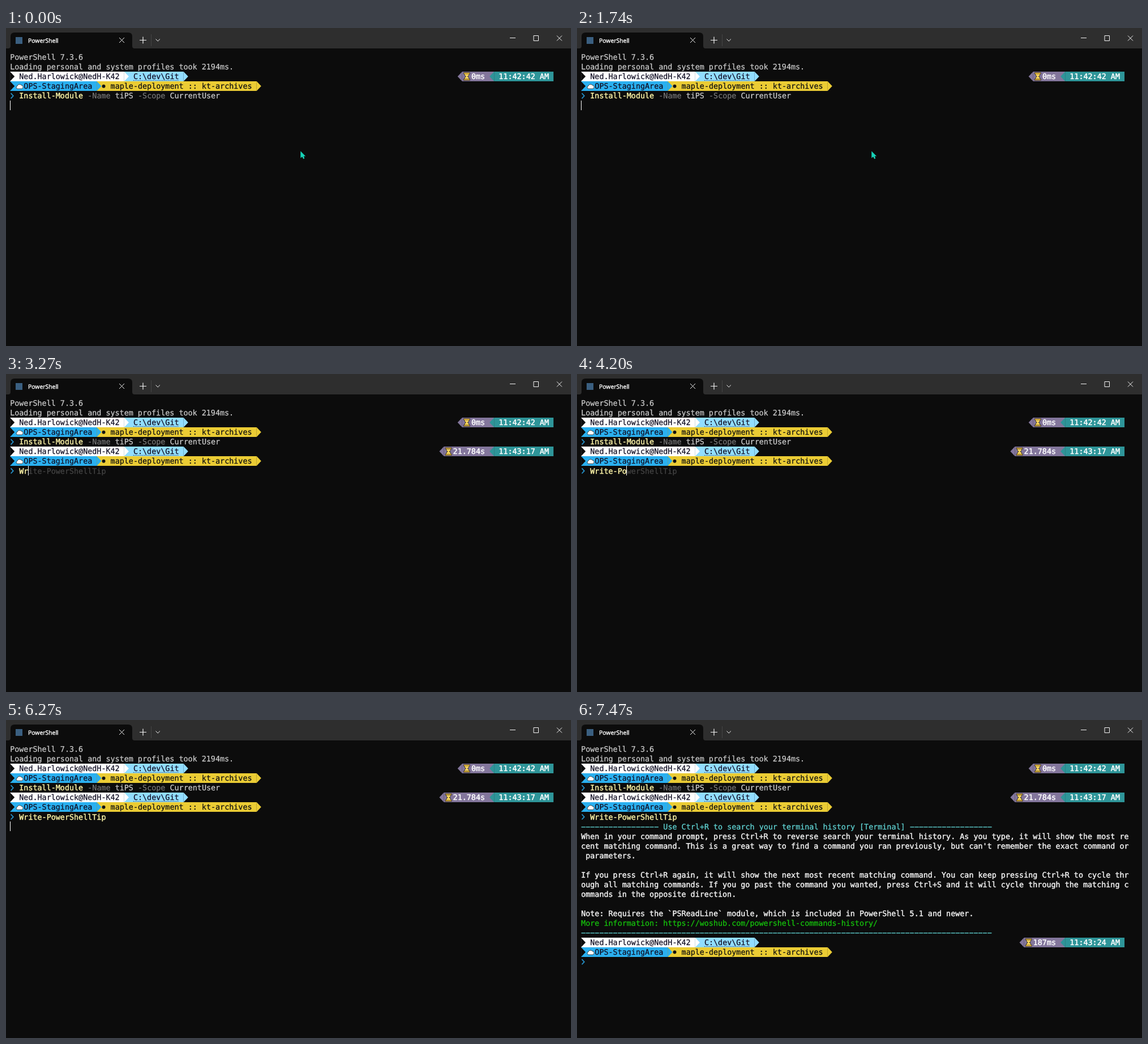
Recreate the animation shown at these times as an HTML page. Size 998 px wide and 561 px high, loop 8 s.

```html
<!DOCTYPE html>
<html lang="en">
<head>
<meta charset="utf-8">
<title>Terminal</title>
<style>
  html, body { margin: 0; width: 100%; height: 100%; overflow: hidden; background: #0c0c0c; }
  svg { display: block; width: 998px; height: 561px; }
  text { white-space: pre; text-rendering: geometricPrecision; font-variant-ligatures: none; }
  .mono { font: 13.4px "DejaVu Sans Mono", monospace; }
  .title { font: 500 10.4px "Open Sans", sans-serif; }
</style>
</head>
<body>
<svg id="stage" viewBox="0 0 998 561"></svg>
<script>
const LOOP = 8000, CELL = 968 / 120, LINE = 17.05;
const GREY = '#cccccc', WHITE = '#f2f2f2', YELLOW = '#f9f1a5', CYAN = '#61d6d6',
      GREEN = '#16c60c', DIM = '#767676', GHOST = '#444444', INK = '#100e23', BACK = '#0c0c0c';
const stage = document.getElementById('stage');
const timed = [];

const colX = col => 7.15 + col * CELL;
const rowY = row => 42.75 + row * LINE;

function add(parent, tag, attrs, content) {
  const node = document.createElementNS('http://www.w3.org/2000/svg', tag);
  for (const key in attrs) node.setAttribute(key, attrs[key]);
  if (content) node.textContent = content;
  parent.append(node);
  return node;
}

// A group visible during [start, end).
function during(start, end) {
  const node = add(stage, 'g', {});
  timed.push({ node, span: [start, end] });
  return node;
}

const shape = (parent, d, fill, extra) => add(parent, 'path', { d, fill, ...extra });
const stroke = (parent, d, color, width = 1) =>
  shape(parent, d, 'none', { stroke: color, 'stroke-width': width });

function write(parent, row, col, content, fill, strong) {
  return add(parent, 'text', {
    class: 'mono', x: colX(col), y: rowY(row) + 13.4,
    fill, stroke: fill, 'stroke-width': strong ? 0.45 : 0.25
  }, content);
}

function block(parent, row, from, to, fill) {
  const top = Math.round(rowY(row)), bottom = Math.round(rowY(row + 1));
  add(parent, 'rect', { x: colX(from), y: top, width: (to - from) * CELL, height: bottom - top, fill });
}

// One-cell triangle; dir 1 points right, -1 points left.
function arrow(parent, row, col, dir, fill) {
  const top = Math.round(rowY(row)), bottom = Math.round(rowY(row + 1));
  const base = colX(dir > 0 ? col : col + 1);
  shape(parent, `M${base} ${top}L${base + dir * CELL} ${(top + bottom) / 2}L${base} ${bottom}Z`, fill);
}

function cloud(parent, x, y) {
  shape(parent, `M${x + 3} ${y + 9}a2.6 2.6 0 0 1 0-5a4 4 0 0 1 7-1.4a3.3 3.3 0 0 1 1 6.4Z`, '#fff',
    { stroke: '#222', 'stroke-width': 0.8 });
}

function hourglass(parent, x, y) {
  const outline = { stroke: '#1c1a18', 'stroke-width': 1.4, 'paint-order': 'stroke' };
  shape(parent, `M${x + 1} ${y + 1}h8q0 4-3 5.5q3 1.5 3 5.5h-8q0-4 3-5.5q-3-1.5-3-5.5Z`, '#f8d45c', outline);
  shape(parent, `M${x} ${y}h10v1.6h-10Zm0 11.4h10v1.6h-10Z`, '#f2c23c', outline);
}

function prompt(parent, row, took, clock) {
  const path = '#91ddff', sky = '#2ab0f0', gold = '#ebcc34', plum = '#83769c', teal = '#2e9599';
  const second = row + 1;
  block(parent, row, 0, 25, '#fff');
  arrow(parent, row, 0, 1, BACK);
  block(parent, row, 25, 38, path);
  arrow(parent, row, 25, 1, '#fff');
  arrow(parent, row, 38, 1, path);
  write(parent, row, 2, 'Ned.Harlowick@NedH-K42', INK);
  write(parent, row, 27, 'C:\\dev\\Git', INK);
  add(parent, 'path', { d: `M${colX(27)} ${Math.round(rowY(row)) + 15.5}H${colX(37)}`,
    stroke: INK, 'stroke-dasharray': '1 1.7' });

  block(parent, second, 0, 19, sky);
  arrow(parent, second, 0, 1, BACK);
  block(parent, second, 19, 54, gold);
  arrow(parent, second, 19, 1, sky);
  arrow(parent, second, 54, 1, gold);
  cloud(parent, 17, rowY(second) + 4.3);
  write(parent, second, 3, 'OPS-StagingArea', INK);
  add(parent, 'circle', { cx: 172.5, cy: rowY(second) + 8.8, r: 3, fill: '#111' });
  write(parent, second, 22, 'maple-deployment :: kt-archives', '#111');

  const start = 104 - took.length;
  arrow(parent, row, start - 3, -1, plum);
  block(parent, row, start - 2, 106, plum);
  arrow(parent, row, 105, -1, teal);
  block(parent, row, 106, 119, teal);
  hourglass(parent, colX(start) - 13, rowY(row) + 2.2);
  write(parent, row, start, took, '#fff', true);
  write(parent, row, 107, clock, '#fff', true);
}

function chevron(parent, row) {
  const y = rowY(row) + 4.2;
  stroke(parent, `M8.6 ${y}l4.2 4.6l-4.2 4.6`, '#2590c8', 1.8);
}

function drawWindow() {
  const bar = add(stage, 'g', {});
  const ink = '#f4f4f4';
  add(bar, 'rect', { width: 998, height: 561, fill: BACK });
  add(bar, 'rect', { width: 998, height: 36, fill: '#2e2e2e' });
  shape(bar, 'M4 36q4 0 4-4V15q0-7 7-7H216q7 0 7 7V32q0 4 4 4Z', BACK);
  add(bar, 'rect', { x: 17, y: 16, width: 12, height: 12, fill: '#3a5f80' });
  add(bar, 'text', { class: 'title', x: 39, y: 26, fill: '#fff', stroke: '#fff', 'stroke-width': 0.4 }, 'PowerShell');
  stroke(bar, 'M200 17l9 9m0-9l-9 9', ink);
  stroke(bar, 'M236 21.5h12m-6-6v12', ink, 1.2);
  stroke(bar, 'M256.5 11v21', '#454545');
  stroke(bar, 'M264.5 19.5l3.7 3.7l3.7-3.7', ink);
  stroke(bar, 'M890 17.5h10', ink);
  stroke(bar, 'M932 13.5h8.5v9h-8.5Z', ink);
  stroke(bar, 'M973 13.5l9 9m0-9l-9 9', ink);
}

function drawTip(parent) {
  const rule = n => '−'.repeat(n);
  write(parent, 8, 0, rule(17), CYAN);
  write(parent, 8, 18, 'Use Ctrl+R to search your terminal history [Terminal]', CYAN);
  write(parent, 8, 72, rule(18), CYAN);
  [
    'When in your command prompt, press Ctrl+R to reverse search your terminal history. As you type, it will show the most re',
    'cent matching command. This is a great way to find a command you ran previously, but can\'t remember the exact command or',
    ' parameters.',
    '',
    'If you press Ctrl+R again, it will show the next most recent matching command. You can keep pressing Ctrl+R to cycle thr',
    'ough all matching commands. If you go past the command you wanted, press Ctrl+S and it will cycle through the matching c',
    'ommands in the opposite direction.',
    '',
    'Note: Requires the `PSReadLine` module, which is included in PowerShell 5.1 and newer.'
  ].forEach((line, i) => write(parent, 9 + i, 0, line, WHITE, true));
  write(parent, 18, 0, 'More information: https://woshub.com/powershell-commands-history/', GREEN);
  write(parent, 19, 0, rule(90), CYAN);
}

drawWindow();
const intro = add(stage, 'g', {});
write(intro, 0, 0, 'PowerShell 7.3.6', GREY);
write(intro, 1, 0, 'Loading personal and system profiles took 2194ms.', GREY);
prompt(intro, 2, '0ms', '11:42:42 AM');
chevron(intro, 4);
write(intro, 4, 2, 'Install-Module', YELLOW, true);
write(intro, 4, 17, '-Name', DIM);
write(intro, 4, 23, 'tiPS', GREY);
write(intro, 4, 28, '-Scope', DIM);
write(intro, 4, 35, 'CurrentUser', GREY);

const progress = during(540, 1740);
write(progress, 5, 0, "Installing package 'tiPS' [", YELLOW, true);
write(progress, 5, 117, ']', YELLOW, true);
block(during(1470, 1740), 5, 27, 117, YELLOW);

prompt(during(2070, LOOP), 5, '21.784s', '11:43:17 AM');
chevron(during(2140, LOOP), 7);
drawTip(during(6470, LOOP));
prompt(during(7340, LOOP), 20, '187ms', '11:43:24 AM');
chevron(during(7470, LOOP), 22);

const command = 'Write-PowerShellTip';
const suggestion = " | ForEach-Object { $_.Trim() } | Where-Object { $_ -match 'history' } | Out-Default";
const keyTimes = [2940, 3270, 3400, 3470, 3540, 3740, 4000, 4200, 4270, 4340, 4400,
                  4600, 4800, 4800, 4940, 5070, 5140, 5870, 6010];
const typed = write(stage, 7, 2, '', YELLOW, true);
const ghost = write(stage, 7, 2, '', GHOST);

shape(during(0, 3000), 'M520.3 217.3V229.6L523.2 227L525.2 231L527.4 230L525.7 226.3H529.2Z', '#16d3b8');

const caret = add(stage, 'rect', { width: 1, height: 17, fill: '#fff' });
// Caret spans as [start, end, row]; on row 7 it follows the typing.
const caretSpans = [[0, 340, 5], [870, 1540, 5], [1600, 2070, 5], [2670, 5810, 7],
                    [5870, 6270, 7], [6270, 6470, 8], [6470, 6870, 20]];

const show = (node, on) => node.setAttribute('display', on ? 'inline' : 'none');
const inside = (t, [from, to]) => t >= from && t < to;

function render(t) {
  for (const { node, span } of timed) show(node, inside(t, span));

  const count = keyTimes.filter(time => time <= t).length;
  typed.textContent = command.slice(0, count);
  ghost.textContent = command.slice(count) + (count === command.length ? suggestion : '');
  ghost.setAttribute('x', colX(2 + count));
  show(ghost, inside(t, [3000, 6270]));

  const span = caretSpans.find(s => inside(t, s));
  show(caret, span);
  if (span) {
    const row = span[2];
    caret.setAttribute('x', Math.floor(colX(row === 7 ? 2 + count : 0)));
    caret.setAttribute('y', Math.round(rowY(row)));
  }
}

const began = performance.now();
function tick() {
  render((performance.now() - began) % LOOP);
  requestAnimationFrame(tick);
}
tick();
</script>
</body>
</html>
```
